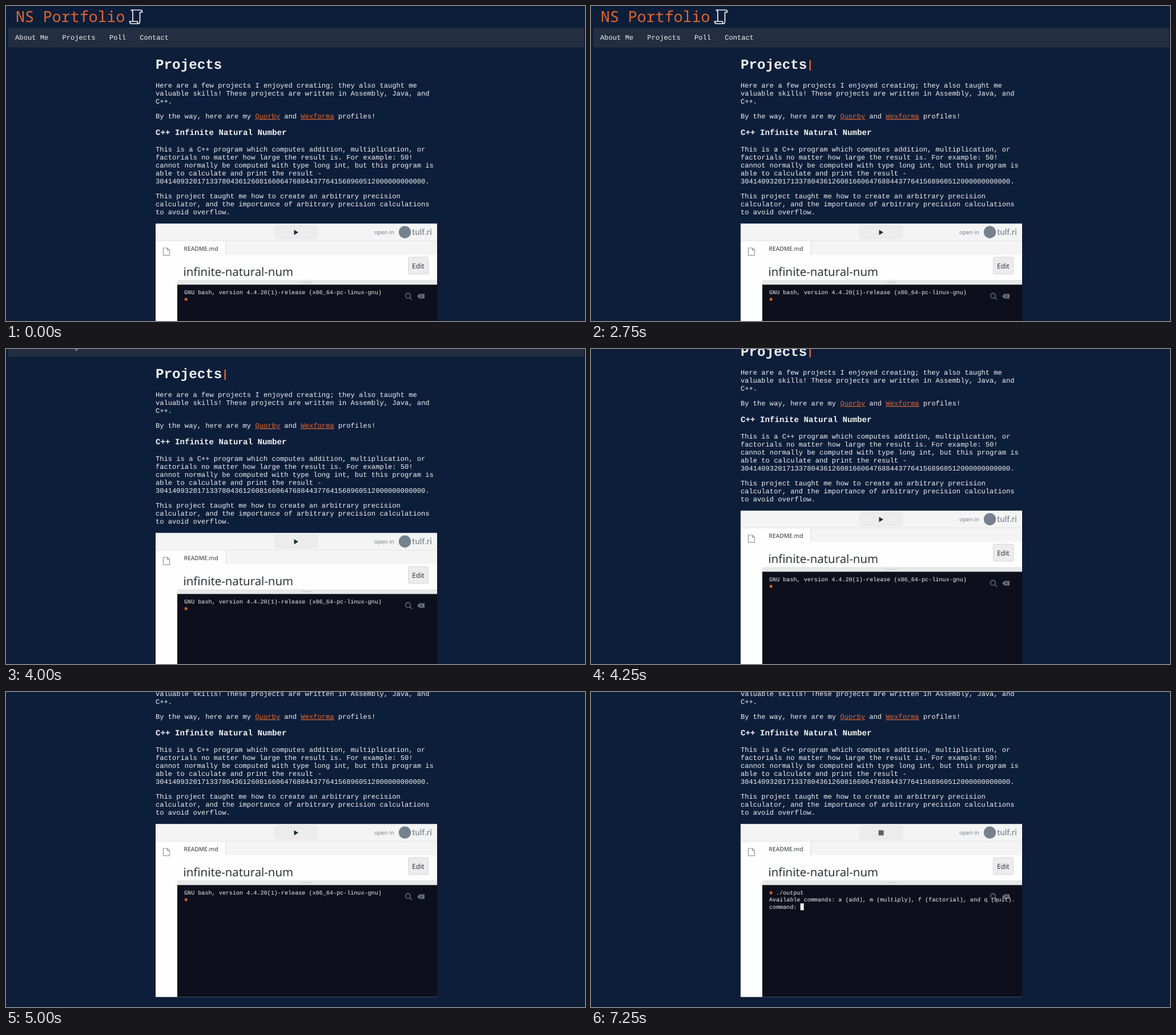
These frames come from a looping animation (1014x552 px, 8000 ms). An HTML page:

```html
<!DOCTYPE html>
<html lang="en">
<head>
<meta charset="utf-8">
<title>Portfolio</title>
<style>
  html, body { margin: 0; width: 100%; height: 100%; overflow: hidden; background: #0d1e3a; }
  svg { display: block; width: 1014px; height: 552px; }
  text { white-space: pre; text-rendering: geometricPrecision; font-variant-ligatures: none; }
  .mono { font: 12.12px "Liberation Mono", monospace; fill: #f2f2f2; }
  .h1 { font-size: 24.24px; font-weight: bold; }
  .h3 { font-size: 14.18px; font-weight: bold; }
  .logo { font: 26.6px "Noto Sans Mono", monospace; fill: #e4672f; }
  .link { fill: #e4672f; text-decoration: underline; }
  .term { font: 10.12px "Liberation Mono", monospace; fill: #f0f0f0; }
  .ui { font-family: "Noto Sans", sans-serif; fill: #30343c; }
</style>
</head>
<body>
<svg viewBox="0 0 1014 552">
  <rect width="1014" height="552" fill="#0d1e3a"/>
  <g id="page">
    <text class="logo" x="17" y="28">NS Portfolio</text>
    <path d="M222 27V11q0-4-3.5-3.5M219 7H236q3 .5 2.5 4H234.5V27q0 4-3 4H219.5q-3-.5-3-4H230q.3 4 2 4"
          fill="none" stroke="#f4f4f4" stroke-width="1.7"/>
    <rect x="4" y="38" width="1008.5" height="34.7" fill="#242e41"/>
    <rect id="hover" x="86.3" y="38" width="82.4" height="34.7" fill="#70b182"/>
    <g id="nav"></g>

    <text class="mono h1" x="262" y="109.5">Projects</text>
    <rect id="caret" x="382.5" y="95" width="2.4" height="18" fill="#e4672f"/>
    <g id="copy"></g>

    <g id="embed">
      <rect x="262" y="381.5" width="493" height="303" fill="#fefefe"/>
      <rect x="262" y="381.5" width="493" height="30" fill="#f4f4f4"/>
      <rect x="384" y="411.5" width="371" height="24.5" fill="#f4f4f4"/>
      <rect x="384" y="411.5" width="2" height="24.5" fill="#e8e8e8"/>
      <path d="M262 411.5H755" stroke="#e2e2e2"/>
      <rect x="470.5" y="385" width="75.5" height="23" rx="5" fill="#ececec" stroke="#e5e5e5"/>
      <path id="play" d="M504.5 392.2L512 396.7L504.5 401.2Z" fill="#12303f"/>
      <rect id="stop" x="503.5" y="392.3" width="9" height="9" fill="#5f6066"/>
      <text class="ui" x="645" y="400.3" font-size="9.9" style="fill:#7c828c">open in</text>
      <circle cx="698.5" cy="396.3" r="10.7" fill="#75818f"/>
      <text x="711" y="401.2" font-size="15" font-family="Lato, sans-serif" fill="#6e7884">tulf.ri</text>

      <path d="M275.5 424H282.5L286.5 428V436.8H275.5ZM282.5 424V428H286.5" fill="none" stroke="#8f949d" stroke-width="1.2"/>
      <text class="ui" x="311.5" y="428.8" font-size="10.3">README.md</text>
      <text class="ui" x="310.5" y="472.5" font-size="20.35">infinite-natural-num</text>
      <rect x="704.5" y="440" width="35" height="30" rx="2" fill="#ececec" stroke="#d6d6d6"/>
      <text class="ui" x="711" y="459.8" font-size="12.1">Edit</text>

      <rect x="300" y="480" width="455" height="8.3" fill="#e8e8e8"/>
      <path d="M517 484H536" stroke="#c6c6c6"/>
      <rect x="300" y="488.3" width="455" height="196.2" fill="#0d101c"/>
      <g fill="none" stroke="#666a73" stroke-width="1.6">
        <circle cx="704" cy="507.7" r="4.3"/>
        <path d="M707.2 511L711 514.6"/>
      </g>
      <path d="M720 508.5L724 504.5H733V512.6H724Z" fill="#6b6f78"/>
      <path d="M725.3 506.5L729.3 510.5M729.3 506.5L725.3 510.5" stroke="#0d101c"/>
      <g id="shell"></g>
      <g id="program"></g>
    </g>
  </g>
</svg>
<script>
const LOOP = 8000;
const CELL = 6.073;
const LEFT = 262;
const TERM_X = 312;
const SCROLL = [[4000, 59], [4250, 98], [4500, 131], [4750, 144], [5000, 150]];

const $ = id => document.getElementById(id);
const text = (x, y, content, cls) => `<text class="${cls}" x="${x}" y="${y}">${content}</text>`;
const lines = (x, y, step, cls, rows) =>
  rows.map((row, i) => text(x, y + i * step, row, cls)).join("");
const prompt = y => `<rect x="313" y="${y - 6}" width="4.5" height="4.5" fill="#d9622f"/>`;
const link = name => `<tspan class="link">${name}</tspan>`;

const paragraph = (y, ...rows) => lines(LEFT, y, 14, "mono", rows);
const terminal = (y, ...rows) => lines(TERM_X, y, 12.1, "term", rows);

let navX = 16.1;
$("nav").innerHTML = ["About Me", "Projects", "Poll", "Contact"].map(label => {
  const item = text(navX, 59, label, "mono");
  navX += label.length * 7.273 + 24.24;
  return item;
}).join("");

$("copy").innerHTML =
  paragraph(143,
    "Here are a few projects I enjoyed creating; they also taught me",
    "valuable skills! These projects are written in Assembly, Java, and",
    "C++.") +
  paragraph(197, `By the way, here are my ${link("Quorby")} and ${link("Wexforma")} profiles!`) +
  text(LEFT, 226.3, "C++ Infinite Natural Number", "mono h3") +
  paragraph(255.3,
    "This is a C++ program which computes addition, multiplication, or",
    "factorials no matter how large the result is. For example: 50!",
    "cannot normally be computed with type long int, but this program is",
    "able to calculate and print the result -",
    "30414093201713378043612608166064768844377641568960512000000000000.") +
  paragraph(337.3,
    "This project taught me how to create an arbitrary precision",
    "calculator, and the importance of arbitrary precision calculations",
    "to avoid overflow.");

$("shell").innerHTML =
  terminal(505.3, "GNU bash, version 4.4.20(1)-release (x86_64-pc-linux-gnu)") + prompt(517.7);

$("program").innerHTML =
  prompt(505.6) +
  terminal(505.3,
    "  ./output",
    "Available commands: a (add), m (multiply), f (factorial), and q (quit).",
    "command: ") +
  `<rect x="${TERM_X + 9 * CELL}" y="520.4" width="${CELL}" height="12" fill="#f4f4f4"/>`;

const show = (id, visible) => $(id).setAttribute("visibility", visible ? "visible" : "hidden");

function render(t) {
  const scroll = SCROLL.reduce((offset, [start, value]) => t >= start ? value : offset, 0);
  $("page").setAttribute("transform", `translate(0 ${-scroll})`);
  show("caret", t % 1500 >= 750);
  show("hover", t >= 1250 && t < 2750);
  show("play", t < 6000);
  show("stop", t >= 6000);
  show("shell", t < 6500);
  show("program", t >= 6500);
}

const start = performance.now();
function tick() {
  render((performance.now() - start) % LOOP);
  requestAnimationFrame(tick);
}
tick();
</script>
</body>
</html>
```
